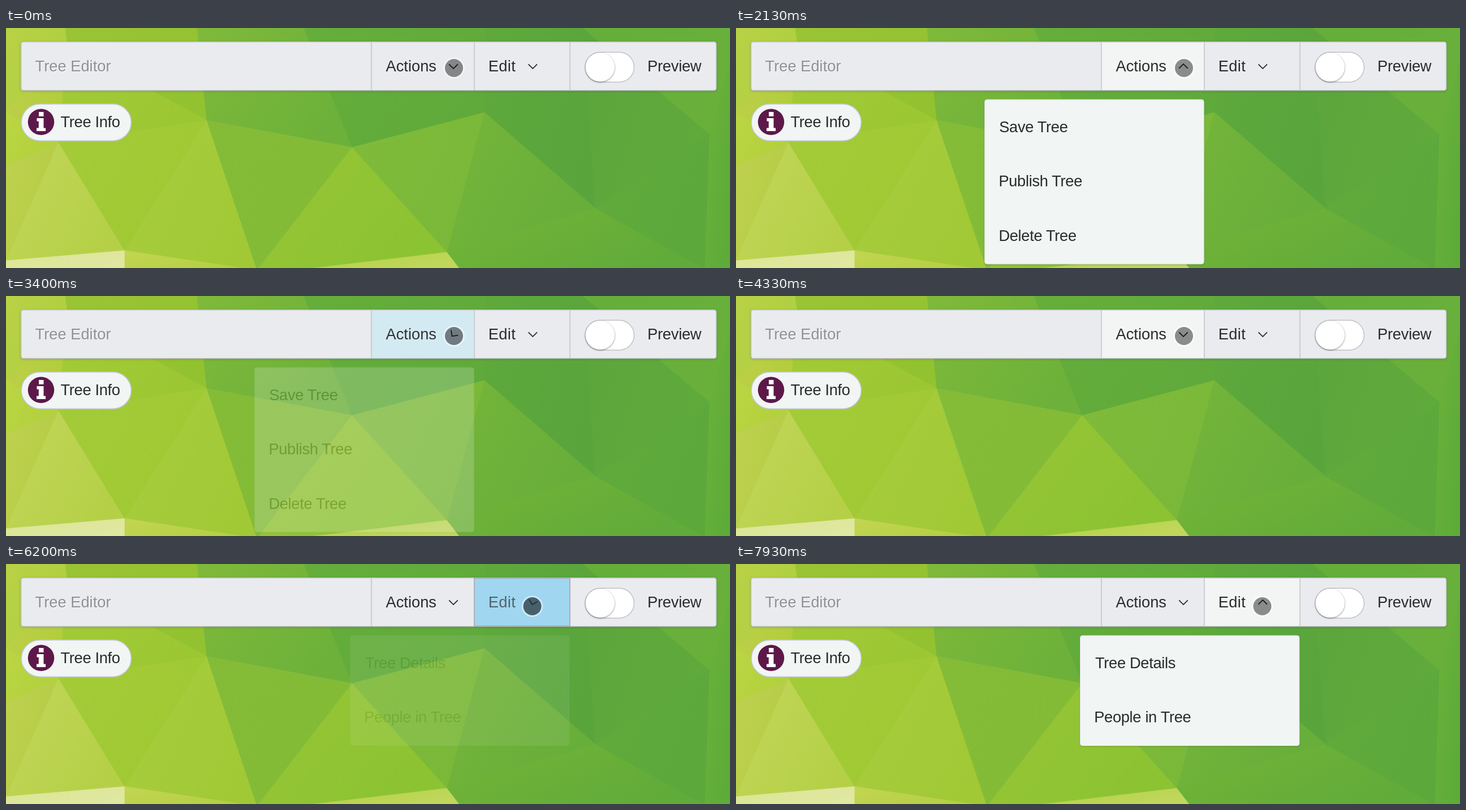
An HTML page for the animation above (8 s loop, 1280x426 px).

```html
<!DOCTYPE html>
<html lang="en">
<head>
<meta charset="utf-8">
<title>Tree Editor</title>
<style>
  html, body { margin: 0; width: 100%; height: 100%; overflow: hidden; background: #7db93a; }
  svg { display: block; width: 100%; height: 100%; }
  text { font: 27.3px "Liberation Sans", Arial, Helvetica, sans-serif; fill: #2a2b2c; white-space: pre; }
  .tight { letter-spacing: -.34px; }
  .title { fill: #8f9194; filter: drop-shadow(1px 1px 0 #f8f9fa); }
  .line { fill: none; stroke: #c1c4c9; stroke-width: 1.5; }
  .bar { fill: #e9ebef; filter: drop-shadow(0 1px 2px rgba(0,0,0,.3)); }
  .soft { fill: #f1f5f4; }
  .chev { fill: none; stroke: #262728; stroke-width: 1.8; }
  .menu { filter: drop-shadow(0 1px 1px rgba(0,0,0,.2)); }
  .knob { fill: #fff; filter: drop-shadow(0 1px 1.5px rgba(0,0,0,.45)); }
  .focus { fill: none; stroke: #667; stroke-width: 1; stroke-dasharray: 1 1; }
</style>
</head>
<body>
<svg viewBox="0 0 1280 426" preserveAspectRatio="none">
  <defs id="defs"></defs>
  <g id="facets"></g>

  <rect class="bar" x="27" y="25" width="1228.5" height="85.5" rx="4"/>
  <text class="title" x="51.5" y="76.5">Tree Editor</text>
  <g id="buttons"></g>
  <path class="line" d="M646 25V110M828 25V110M997 25V110"/>
  <rect class="line" x="26.7" y="24.7" width="1229" height="86" rx="4"/>
  <g id="focus"></g>

  <rect x="1024" y="43" width="86.5" height="53" rx="26.5" fill="#fff" stroke="#c0c2c6" stroke-width="1.5"/>
  <circle class="knob" cx="1050.3" cy="69.5" r="25.8"/>
  <text x="1134" y="76.5" style="letter-spacing:-.25px">Preview</text>

  <rect class="soft" x="27" y="134.8" width="194.5" height="65.5" rx="32.7" stroke="#c0c4c9" stroke-width="1.7"/>
  <circle cx="62" cy="166.8" r="23.3" fill="#5d1849"/>
  <path fill="#fff" d="M58 149h8.5v7.7h-8.5zM54.5 160h12v17.5h3.6v5.5H54v-5.5h3.8v-12h-3.3z"/>
  <text class="tight" x="96.5" y="176">Tree Info</text>

  <g id="menus"></g>
  <g id="cursor">
    <circle r="17.3" fill="none" stroke="#fff" stroke-opacity=".5" stroke-width="3"/>
    <circle id="dot" r="16"/>
  </g>
</svg>
<script>
const NS = 'http://www.w3.org/2000/svg';
const $ = id => document.getElementById(id);

function add(parent, tag, attrs, text) {
  const el = document.createElementNS(NS, tag);
  for (const k in attrs) el.setAttribute(k, attrs[k]);
  if (text) el.textContent = text;
  return parent.appendChild(el);
}

// Backdrop: named corners, then facets as corner lists with two tones
const corners = {
  a: [0, 0], b: [105, 0], c: [338, 0], d: [527, 0], K: [847, 0], e: [1020, 0],
  M: [1280, 60], f: [1280, 0], g: [0, 150], z: [109, 30], h: [93, 203],
  i: [355, 164], j: [612, 212], k: [846, 150], l: [1042, 320], m: [1244, 188],
  n: [0, 245], o: [0, 413], p: [210, 395], q: [444, 430], r: [530, 428],
  s: [780, 398], t: [803, 428], u: [0, 428], v: [210, 428], w: [1280, 428],
  x: [1236, 428], y: [1280, 205]
};
const facets = [
  ['abzg', '#b9d146', '#afcf41'], ['gzh', '#c0d04b', '#b1cd3c'],
  ['ghn', '#bcd543', '#b0d13b'], ['nho', '#bfd14f', '#b4cc45'],
  ['hop', '#c3d65a', '#b5d047'], ['zbci', '#9ac434', '#93c230'],
  ['zih', '#a4cb37', '#9bc733'], ['hip', '#a4cb38', '#9fc933'],
  ['piq', '#a8cd3f', '#a1c935'], ['uopv', '#dde694', '#dfe7a0'],
  ['pqv', '#c3d553', '#b4cf42'], ['cdji', '#7fb93a', '#6db13a'],
  ['ijq', '#84bc38', '#83bb37'], ['jsrq', '#97c536', '#8cc332'],
  ['rst', '#b3d144', '#c0d75c'], ['dKkj', '#65ae3b', '#60aa3b'],
  ['Kelk', '#5fa93c', '#59a53c'], ['jks', '#80bb3a', '#7ab839'],
  ['kls', '#76b53a', '#67ae3a'], ['slxt', '#74b536', '#61ab3a'],
  ['eml', '#5ba53c', '#60aa3c'], ['efMm', '#65ae3a', '#69b03b'],
  ['mMy', '#6ab23a', '#62ad39'], ['lmx', '#62ab3c', '#5ca83b'],
  ['mywx', '#69b13a', '#5dab39']
];
facets.forEach(([path, from, to], n) => {
  const grad = add($('defs'), 'linearGradient', { id: 'g' + n, x2: 1, y2: .5 });
  add(grad, 'stop', { 'stop-color': from });
  add(grad, 'stop', { offset: 1, 'stop-color': to });
  const fill = `url(#g${n})`;
  add($('facets'), 'polygon', {
    points: [...path].map(p => corners[p]).join(' '),
    fill, stroke: fill, 'stroke-width': .8
  });
});

function makeButton(label, x, width, textX, chevX, menuX, items, spacing) {
  const box = { x, y: 25.4, width, height: 84.6 };
  const hover = add($('buttons'), 'rect', { ...box, fill: '#f2f5f4' });
  const press = add($('buttons'), 'rect', { ...box, fill: '#a0d6f0' });
  const face = add($('buttons'), 'g', {});
  add(face, 'text', { x: textX, y: 76.5, 'letter-spacing': spacing }, label);
  const chev = add(face, 'path', { class: 'chev', d: 'M-7.7-3.6L0 4.1L7.7-3.6' });
  const focus = add($('focus'), 'rect', { ...box, class: 'focus' });
  const menu = add($('menus'), 'g', { class: 'menu' });
  add(menu, 'rect', {
    class: 'soft', x: menuX, y: 127, width: 387.5, height: 96.5 * items.length + 2.5,
    rx: 4, stroke: '#d9dfdc', 'stroke-width': 1
  });
  items.forEach((item, n) => add(menu, 'text', {
    class: 'tight', x: menuX + (item[0] === 'S' ? 25.5 : item[0] === 'T' ? 26.5 : 24.7),
    y: 184.5 + 96.5 * n
  }, item));
  return (over, down, open) => {
    hover.setAttribute('opacity', over);
    press.setAttribute('opacity', down);
    focus.setAttribute('opacity', down > .9 ? 1 : 0);
    face.setAttribute('opacity', 1 - .33 * down * down);
    chev.setAttribute('transform', `translate(${chevX} 68) rotate(${180 * open})`);
    menu.setAttribute('opacity', open);
  };
}
const actions = makeButton('Actions', 646, 182, 671.5, 791, 439.7,
  ['Save Tree', 'Publish Tree', 'Delete Tree'], 0);
const edit = makeButton('Edit', 828, 169, 852.8, 931.3, 608.5,
  ['Tree Details', 'People in Tree'], .3);

const LOOP = 8000, STEP = LOOP / 120;
const OPEN = 1550, CLOSE = 3150, OPEN_EDIT = 6139;
const ramp = (t, start, dur) => Math.min(1, Math.max(0, (t - start) / dur));
const ease = (t, start, dur) => {
  const p = ramp(t, start, dur);
  return p * p * (3 - 2 * p);
};
const flash = (t, click) => ramp(t, click - 130, 70) - ramp(t, click + 130, 190);

function draw(t) {
  const downA = flash(t, OPEN) + flash(t, CLOSE);
  const downE = flash(t, OPEN_EDIT);
  actions(ease(t, 70, 200) - ease(t, 5070, 200), downA,
    ease(t, OPEN, 350) - ease(t, CLOSE, 350));
  edit(ease(t, 5130, 200), downE, ease(t, OPEN_EDIT, 350));
  const move = ease(t, 4900, 500);
  $('cursor').setAttribute('transform', `translate(${792 + 138.5 * move} ${71 + 4 * move})`);
  $('dot').setAttribute('fill-opacity', .43 + .12 * Math.max(downA, downE));
}

const began = performance.now();
function tick() {
  const t = (performance.now() - began) % LOOP;
  draw(Math.floor(t / STEP) * STEP);
  requestAnimationFrame(tick);
}
tick();
</script>
</body>
</html>
```
